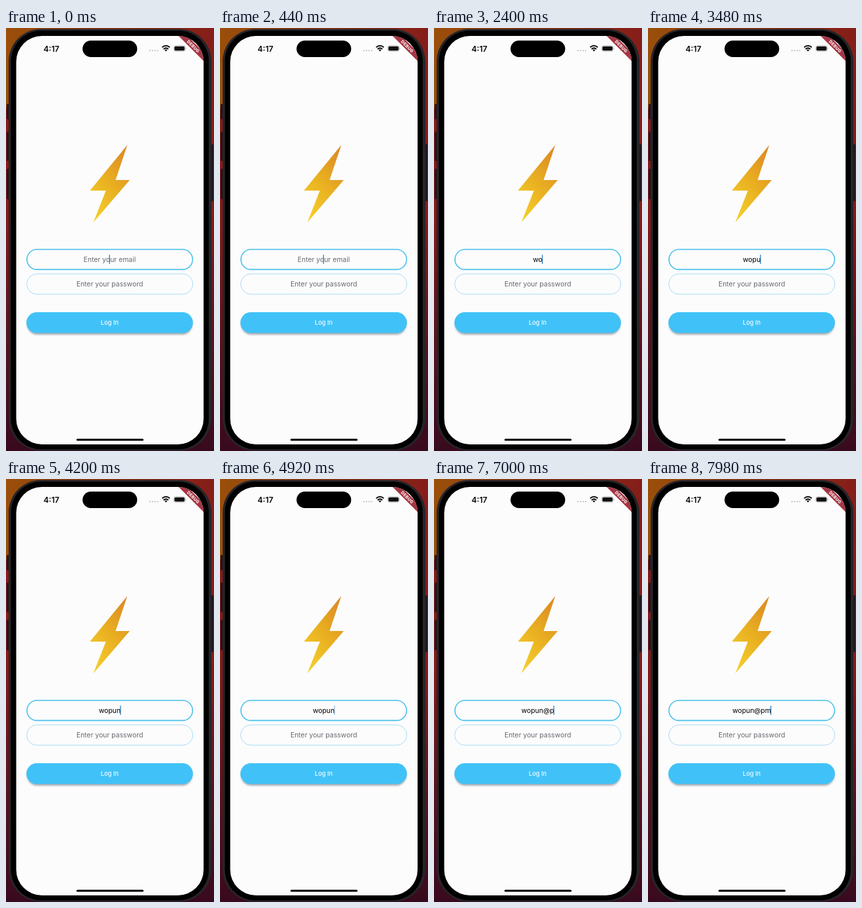
Write an HTML page that moves like this. It is 316x640 px and loops after 8 s.

```html
<!DOCTYPE html>
<html lang="en">
<head>
<meta charset="utf-8">
<title>Login screen</title>
<style>
  html, body { margin: 0; width: 100%; height: 100%; overflow: hidden; background: #6a1419; }
  svg { display: block; width: 100%; height: 100%; }
  text { font-family: Inter, Roboto, sans-serif; font-size: 10.4px; text-anchor: middle; }
  .hint { fill: #676a70; }
</style>
</head>
<body>
<svg viewBox="0 0 316 640">
  <defs>
    <linearGradient id="wall" x1="0" y1="0" x2="0" y2="1">
      <stop offset="0" stop-color="#851d19"/>
      <stop offset=".45" stop-color="#86191a"/>
      <stop offset="1" stop-color="#380a1e"/>
    </linearGradient>
    <linearGradient id="glow">
      <stop offset="0" stop-color="#9a4f0a"/>
      <stop offset="1" stop-color="#9a4f0a" stop-opacity="0"/>
    </linearGradient>
    <linearGradient id="gold" x1=".2" y1="1" x2=".8" y2="0">
      <stop offset="0" stop-color="#f5cf2c"/>
      <stop offset=".5" stop-color="#e9b021"/>
      <stop offset="1" stop-color="#dc8a24"/>
    </linearGradient>
    <filter id="shadow" x="-10%" y="-30%" width="120%" height="180%">
      <feGaussianBlur stdDeviation="1.7"/>
    </filter>
    <clipPath id="screen"><rect x="15.5" y="12" width="284.7" height="618" rx="39"/></clipPath>
  </defs>

  <rect width="316" height="640" fill="url(#wall)"/>
  <rect width="316" height="122" fill="url(#glow)"/>
  <g fill="#24151a">
    <rect x="1" y="115" width="5" height="23" rx="1"/>
    <rect x="1" y="157" width="5" height="44" rx="1"/>
    <rect x="1" y="213" width="5" height="46" rx="1"/>
    <rect x="309" y="176" width="6" height="86" rx="1"/>
  </g>
  <rect x="4" y="1.5" width="308" height="638" rx="49" fill="#27252a"/>
  <rect x="7.5" y="4" width="300.5" height="633.5" rx="46"/>

  <g clip-path="url(#screen)">
    <rect x="15" y="12" width="286" height="618" fill="#fcfcfd"/>
    <g transform="translate(284.6 27.8) rotate(45)">
      <rect x="-40" y="-4.7" width="80" height="9.4" fill="#a43644"/>
      <text y="2.3" fill="#fbeff0" style="font-size:6.4px;font-weight:800;letter-spacing:.3px">DEBUG</text>
    </g>
  </g>

  <rect x="116.3" y="19" width="83" height="25" rx="12.5"/>
  <text x="69" y="35.5" style="font-size:12px;font-weight:600">4:17</text>
  <path d="M218.7 34.3h13" stroke="#b4b4b8" stroke-width="2" stroke-linecap="round" stroke-dasharray="0 3.9"/>
  <g fill="none" stroke="#111" stroke-width="2">
    <path d="M237.2 29.3Q243 24.3 248.8 29.3M239.4 31.9Q243 28.8 246.6 31.9"/>
    <path d="M241 33.4Q243 31.8 245 33.4L243 35.6Z" fill="#111" stroke="none"/>
  </g>
  <rect x="254.7" y="26.7" width="17.8" height="8.6" rx="2.8" fill="none" stroke="#b4b4b8" stroke-width=".8"/>
  <rect x="255.8" y="27.8" width="15.6" height="6.4" rx="1.8" fill="#111"/>
  <path d="M273.6 29.5q1.6 1.5 0 3z" fill="#b4b4b8"/>

  <path d="M184.3 177 127.5 246H151.8L132.6 294.3 188 230H166.5Z" fill="url(#gold)"/>

  <g fill="none">
    <rect x="31.8" y="335" width="251.7" height="30.4" rx="15.2" stroke="#48c0ea" stroke-width="1.6"/>
    <rect x="31.5" y="372" width="252.3" height="30.8" rx="15.4" stroke="#a8dcf6"/>
  </g>
  <rect id="caret" y="343" width="1.4" height="14" rx=".5" fill="#3a86c4"/>
  <text id="email" x="157.5" y="353.7"></text>
  <text class="hint" x="157.6" y="390.7">Enter your password</text>

  <rect x="32" y="433" width="251" height="31" rx="15.5" fill="#70757a" opacity=".6" filter="url(#shadow)"/>
  <rect x="31" y="430" width="253" height="31.6" rx="15.8" fill="#40c2f8"/>
  <text x="157.5" y="449.2" fill="#f7fcff" style="font-size:9.2px;font-weight:500">Log In</text>
  <rect x="107" y="621.6" width="102" height="3" rx="1.5"/>
</svg>
<script>
  const LOOP = 8000, CENTER = 157.5;
  const address = 'wopun@pm';
  const keyTimes = [1900, 2180, 2800, 3200, 3960, 5780, 6900, 7620];
  const email = document.getElementById('email');
  const caret = document.getElementById('caret');
  let shown = -1;

  // Caret holds, fades out, rests and fades in once a second, in quarter steps.
  function caretOpacity(ms) {
    const phase = ms % 1000;
    if (phase < 500) return 1;
    if (phase < 850) return Math.max(0, 0.75 - Math.floor((phase - 500) / 37.5) / 4);
    return Math.min(1, Math.floor((phase - 850) / 37.5) / 4);
  }

  function draw(now) {
    const t = now % LOOP;
    const typed = keyTimes.filter(k => k <= t).length;
    if (typed !== shown) {
      shown = typed;
      email.textContent = typed ? address.slice(0, typed) : 'Enter your email';
      email.setAttribute('class', typed ? '' : 'hint');
    }
    const textWidth = typed ? email.getComputedTextLength() : 0;
    caret.setAttribute('x', CENTER + textWidth / 2 - 0.9);
    caret.setAttribute('opacity', caretOpacity(t - (typed ? keyTimes[typed - 1] : 0)));
  }

  const start = performance.now();
  function tick() {
    draw(performance.now() - start);
    requestAnimationFrame(tick);
  }
  tick();
</script>
</body>
</html>
```
